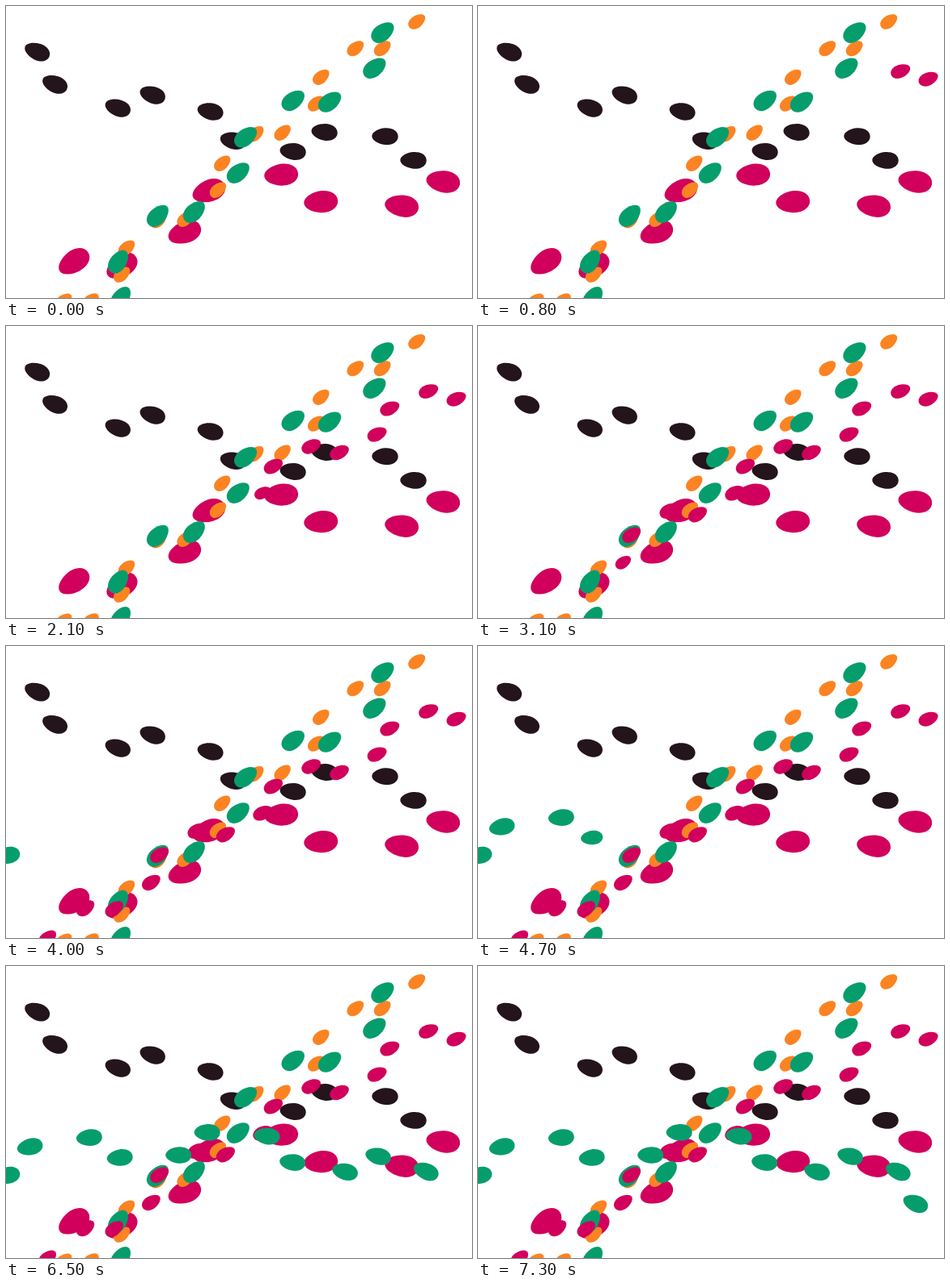
An HTML page that plays this animation: 576 px wide and 362 px high, repeating every 7400 ms.

```html
<!DOCTYPE html>
<html lang="en">
<head>
<meta charset="utf-8">
<title>Footsteps</title>
<style>
  html, body { margin: 0; width: 100%; height: 100%; overflow: hidden; background: #fff; }
  svg { display: block; width: 100%; height: 100%; }
</style>
</head>
<body>
<svg id="stage" viewBox="0 0 576 362"></svg>
<script>
const LOOP = 7400, INTERVAL = 250, GROW = 60;
const BLACK = '#24141c', PINK = '#d1005c', ORANGE = '#fb8322', GREEN = '#069d6c';
const SOLE = 'M-1 0C-1-.5-.5-.9 0-.97S1-.68 1 0 .5 1.04 0 .97-1 .5-1 0Z';

// Proportions of a step, relative to half the length of a sole.
const WIDTH = 0.66, STRIDE = 1.1, GAP = 0.89;

const stage = document.getElementById('stage');
const walkers = [];

// Smooth curve through four points, evenly spaced in u from 0 to 1.
function pointOn([a, b, c, d], u) {
  const s = u * 3;
  const cubic = axis =>
    -a[axis] * (s - 1) * (s - 2) * (s - 3) / 6 +
    b[axis] * s * (s - 2) * (s - 3) / 2 -
    c[axis] * s * (s - 1) * (s - 3) / 2 +
    d[axis] * s * (s - 1) * (s - 2) / 6;
  return [cubic(0), cubic(1)];
}

function directionOn(path, u) {
  const [x0, y0] = pointOn(path, u - 0.001);
  const [x1, y1] = pointOn(path, u + 0.001);
  return Math.atan2(y1 - y0, x1 - x0);
}

function addSole(color, size, x, y, angle) {
  const sole = document.createElementNS('http://www.w3.org/2000/svg', 'path');
  sole.setAttribute('d', SOLE);
  sole.setAttribute('fill', color);
  const pose = scale => sole.setAttribute('transform',
    `translate(${x} ${y}) rotate(${angle * 180 / Math.PI}) scale(${size * scale} ${size * WIDTH * scale})`);
  pose(1);
  stage.append(sole);
  return { sole, pose };
}

// Feet come in pairs; the foot that leads changes with every pair.
// firstSide is 1 for the right foot, -1 for the left. Without a start the trail is static.
function addTrail({ color, size, pairs, firstSide, path, start }) {
  for (let i = 0; i < pairs * 2; i++) {
    const pair = i >> 1, second = i % 2;
    const u = pair / (pairs - 1);
    const [x, y] = pointOn(path, u);
    const angle = directionOn(path, u);
    const along = size * STRIDE * (second ? 1 : -1);
    const across = size * GAP * firstSide * ((pair + second) % 2 ? -1 : 1);
    const step = addSole(color, size,
      x + along * Math.cos(angle) - across * Math.sin(angle),
      y + along * Math.sin(angle) + across * Math.cos(angle), angle);
    if (start !== undefined) walkers.push({ ...step, at: start + i * INTERVAL });
  }
}

addTrail({ color: BLACK, size: 16.2, pairs: 5, firstSide: -1,
  path: [[49.5, 76.7], [195.5, 129.6], [338, 163], [486, 176.5]] });
addTrail({ color: PINK, size: 21, pairs: 4, firstSide: -1,
  path: [[113.5, 319.7], [235.7, 255], [364.7, 226], [514.7, 232.7]] });
addTrail({ color: ORANGE, size: 11.8, pairs: 8, firstSide: 1,
  path: [[512, 3], [366, 122], [225, 247], [88, 365.5]] });
addTrail({ color: GREEN, size: 16, pairs: 5, firstSide: 1,
  path: [[460.7, 54.7], [349, 139.5], [236.5, 232.3], [140.5, 339.5]] });
addTrail({ color: PINK, size: 12.6, pairs: 8, firstSide: -1, start: 300,
  path: [[539.5, 85.5], [371, 165], [207.7, 260.5], [48, 380]] });
addTrail({ color: GREEN, size: 16, pairs: 6, firstSide: 1, start: 3900,
  path: [[15.5, 242], [194.5, 220.7], [373, 232], [530, 274.5]] });

function draw(time) {
  for (const { sole, pose, at } of walkers) {
    const scale = Math.max(0, Math.min(1, (time - at) / GROW));
    sole.style.display = scale ? '' : 'none';
    pose(scale);
  }
}

const begin = performance.now();
function tick() {
  draw((performance.now() - begin) % LOOP);
  requestAnimationFrame(tick);
}
tick();
</script>
</body>
</html>
```
